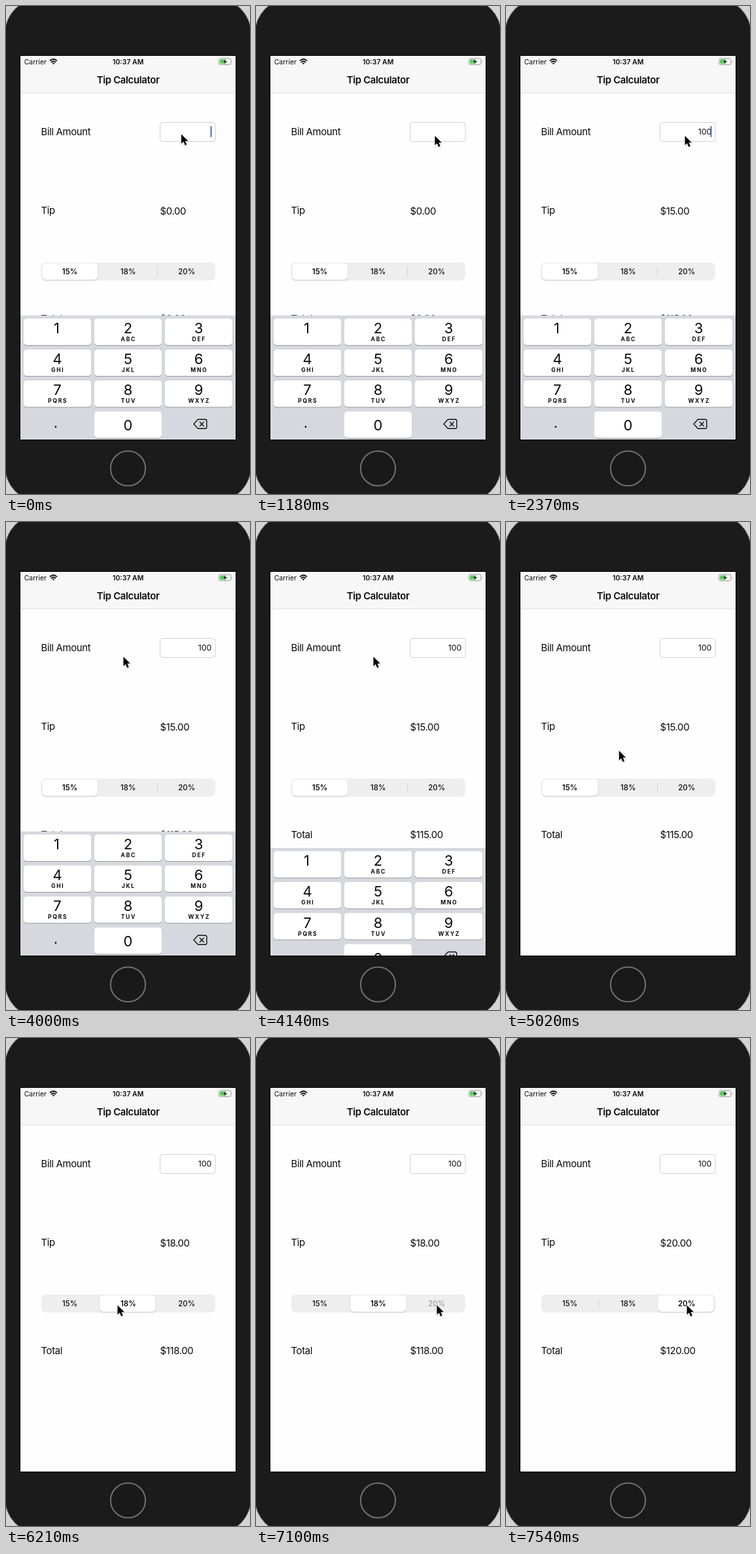
Write an HTML page that moves like this. It is 373 px wide and 744 px high and loops after 7.99 s.

```html
<!DOCTYPE html>
<html lang="en">
<head>
<meta charset="utf-8">
<title>Tip Calculator</title>
<style>
html, body { margin: 0; height: 100%; overflow: hidden; background: #d4d4d4; }
svg { display: block; width: 373px; height: 744px; }
text { font: 14.9px Inter, sans-serif; letter-spacing: -.023em; fill: #0b0b0b; }
.mid { text-anchor: middle; }
.title { font-weight: 600; }
.status { font-size: 10.5px; letter-spacing: 0; }
.seg { font-size: 11.5px; letter-spacing: 0; }
.entry { font-size: 12.3px; letter-spacing: 0; text-anchor: end; }
.digit { font-size: 22px; letter-spacing: 0; }
.letters { font-size: 8.5px; font-weight: 700; letter-spacing: 1.7px; }
</style>
</head>
<body>
<svg viewBox="0 0 373 744">
  <defs>
    <clipPath id="screen"><path d="M22 76H351V661H22z"/></clipPath>
    <filter id="soft" x="-20%" y="-20%" width="140%" height="160%">
      <feDropShadow dx="0" dy="1.2" stdDeviation="1.2" flood-opacity=".2"/>
    </filter>
  </defs>

  <!-- Phone body -->
  <rect x="-2" y="-12" width="377" height="768" rx="55" fill="#1b1b1b" stroke="#8c8c8c"/>
  <circle cx="186.5" cy="705" r="26.6" fill="#191919" stroke="#707070" stroke-width="2"/>
  <path d="M21 75H352V662H21z" fill="#000"/>

  <g clip-path="url(#screen)">
    <path d="M22 76H351V661H22z" fill="#fefefe"/>
    <path d="M22 76H351V132H22z" fill="#f7f7f7"/>
    <path d="M22 132.5H351" stroke="#e0e0e0"/>

    <!-- Status bar -->
    <text class="status" x="27.7" y="89">Carrier</text>
    <text class="status mid title" x="186.7" y="89">10:37 AM</text>
    <g fill="none" stroke="#0b0b0b" stroke-width="1.9">
      <path d="M67 83.6Q72.5 78.4 78 83.6M69 86Q72.5 82.6 76 86"/>
      <path d="M70.7 87.2Q72.5 85.8 74.3 87.2L72.5 89.2z" fill="#0b0b0b" stroke="none"/>
    </g>
    <rect x="325.5" y="80" width="18.5" height="9.5" rx="2.6" fill="none" stroke="#999"/>
    <rect x="327" y="81.5" width="8.5" height="6.5" rx="1.3" fill="#4cd04f"/>
    <path d="M345.3 83Q347 84.7 345.3 86.5z" fill="#999"/>
    <path d="M336.6 80.2L330.8 85.6H334.2L332.6 89.6L338.8 84H335.2z" fill="#111" stroke="#f7f7f7" stroke-width=".5"/>

    <text class="mid title" x="186.7" y="118">Tip Calculator</text>
    <text x="53.5" y="197.4">Bill Amount</text>
    <text x="53.5" y="317.4">Tip</text>
    <text x="53.5" y="482.4">Total</text>
    <text id="tip" x="235.5" y="317.6"></text>
    <text id="total" x="235.5" y="481.7"></text>

    <rect x="235.5" y="177.5" width="84.5" height="29" rx="3.8" fill="#fff" stroke="#d0d0d0"/>
    <text id="entry" class="entry" x="314.3" y="196.2"></text>
    <rect id="caret" x="312.5" y="183" width="2" height="17" rx="1" fill="#4b69ca"/>

    <rect x="53.7" y="391" width="266.3" height="27.5" rx="7" fill="#eeeeef"/>
    <path class="divider" d="M141.5 397.5V412.5" stroke="#d4d4d7"/>
    <path class="divider" d="M231.5 397.5V412.5" stroke="#d4d4d7"/>
    <rect id="thumb" x="55.2" y="392.6" width="85" height="24.6" rx="5.8" fill="#fff" filter="url(#soft)"/>
    <g id="rates"></g>

    <g id="keyboard">
      <path d="M22 471.7H351V661.5H22z" fill="#d6d8de"/>
      <g id="keys"></g>
      <path d="M293.5 630.3H304.5Q306.8 630.3 306.8 632.6V642Q306.8 644.3 304.5 644.3H293.5L287 637.3z
        M296.3 634.2L302.3 640.4M302.3 634.2L296.3 640.4" fill="none" stroke="#111" stroke-width="1.4" stroke-linejoin="round" stroke-linecap="round"/>
    </g>
  </g>

  <path id="pointer" d="M0 0V14.3L3.3 11.3L5.7 16.8L8.3 15.7L5.9 10.3H10.4z" fill="#000" stroke="#fff" stroke-width="1.1" paint-order="stroke" filter="url(#soft)"/>
</svg>

<script>
const $ = id => document.getElementById(id);
const LOOP = 7990, TICKS = 54, TICK = LOOP / TICKS;
const RATES = [15, 18, 20];

const label = (cls, x, y, s) => `<text class="mid ${cls}" x="${x}" y="${y}">${s}</text>`;

$('rates').innerHTML = RATES.map((r, i) => label('seg', 97.5 + 89.3 * i, 409.2, r + '%')).join('');

$('keys').innerHTML = ['1', '2 ABC', '3 DEF', '4 GHI', '5 JKL', '6 MNO', '7 PQRS', '8 TUV', '9 WXYZ', '.', '0'].map((key, i) => {
  const [digit, letters = ''] = key.split(' ');
  const x = 27 + 108 * (i % 3), y = 476.6 + 47.2 * Math.floor(i / 3), cx = x + 51.5;
  if (digit === '.') return label('digit', cx - 2.5, y + 24.5, digit);
  const box = (dy, fill) => `<rect x="${x}" y="${y + dy}" width="103" height="40.3" rx="4.4" fill="${fill}"/>`;
  return box(1, '#96989d') + box(0, '#fff') +
    label('digit', cx - (digit === '1' ? 1 : 0), y + (digit === '0' ? 29.2 : 22.4), digit) +
    label('letters', cx + .8, y + 34.4, letters);
}).join('');

// Pointer stops: tick, x, y
const PATH = [
  [0, 268, 195.5], [2, 273.5, 198], [23, 273.5, 198], [27, 179.5, 205.5], [31, 179.5, 205.5],
  [34, 169.5, 420.5], [36, 170.5, 407.5], [43, 170.5, 407.5], [46, 276.5, 407.5], [TICKS, 276.5, 407.5]
];
// Caret opacity changes: tick, opacity
const BLINK = [[0, 1], [1, .5], [2, 0], [4, 1], [7, .5], [8, 0], [10, .5], [11, 1], [19, .5], [20, 0], [23, 1], [26, .5], [27, 0]];

const money = n => '$' + n.toFixed(2);
const rates = [...$('rates').children];
const dividers = document.querySelectorAll('.divider');

// Critically damped spring, from 0 to 1
function spring(ticks) {
  const p = Math.max(0, ticks) * TICK * .018;
  return 1 - (1 + p) * Math.exp(-p);
}

function pointerAt(k) {
  const i = PATH.findIndex(p => p[0] > k);
  const [k0, x0, y0] = PATH[i - 1], [k1, x1, y1] = PATH[i];
  const f = (k - k0) / (k1 - k0);
  return [x0 + (x1 - x0) * f, y0 + (y1 - y0) * f];
}

function draw(k) {
  const typed = '100'.slice(0, k < 12 ? 0 : k < 14 ? 1 : k < 16 ? 2 : 3);
  const selected = k < 40 ? 0 : k < 49 ? 1 : 2;
  const pressed = k === 39 ? 1 : k === 48 ? 2 : -1;
  const bill = +typed, tip = bill * RATES[selected] / 100;

  $('entry').textContent = typed;
  $('tip').textContent = money(tip);
  $('total').textContent = money(bill + tip);
  $('caret').setAttribute('opacity', BLINK.findLast(b => b[0] <= k)[1]);

  const slide = spring(k - 39.6) + spring(k - 48.6);
  $('thumb').setAttribute('transform', `translate(${89.2 * slide})`);
  rates.forEach((r, i) => {
    r.style.fontWeight = i === selected ? 600 : 500;
    r.style.opacity = i === pressed ? .35 : 1;
  });
  dividers.forEach((d, i) => d.setAttribute('opacity', selected === i || selected === i + 1 ? 0 : 1));

  $('keyboard').setAttribute('transform', `translate(0 ${191 * spring(k - 27.763)})`);
  $('pointer').setAttribute('transform', `translate(${pointerAt(k)})`);
}

// The screen refreshes in even, held ticks
function loop(now) {
  draw(Math.floor((now % LOOP) / TICK + .05) % TICKS);
  requestAnimationFrame(loop);
}
loop(performance.now());
</script>
</body>
</html>
```
